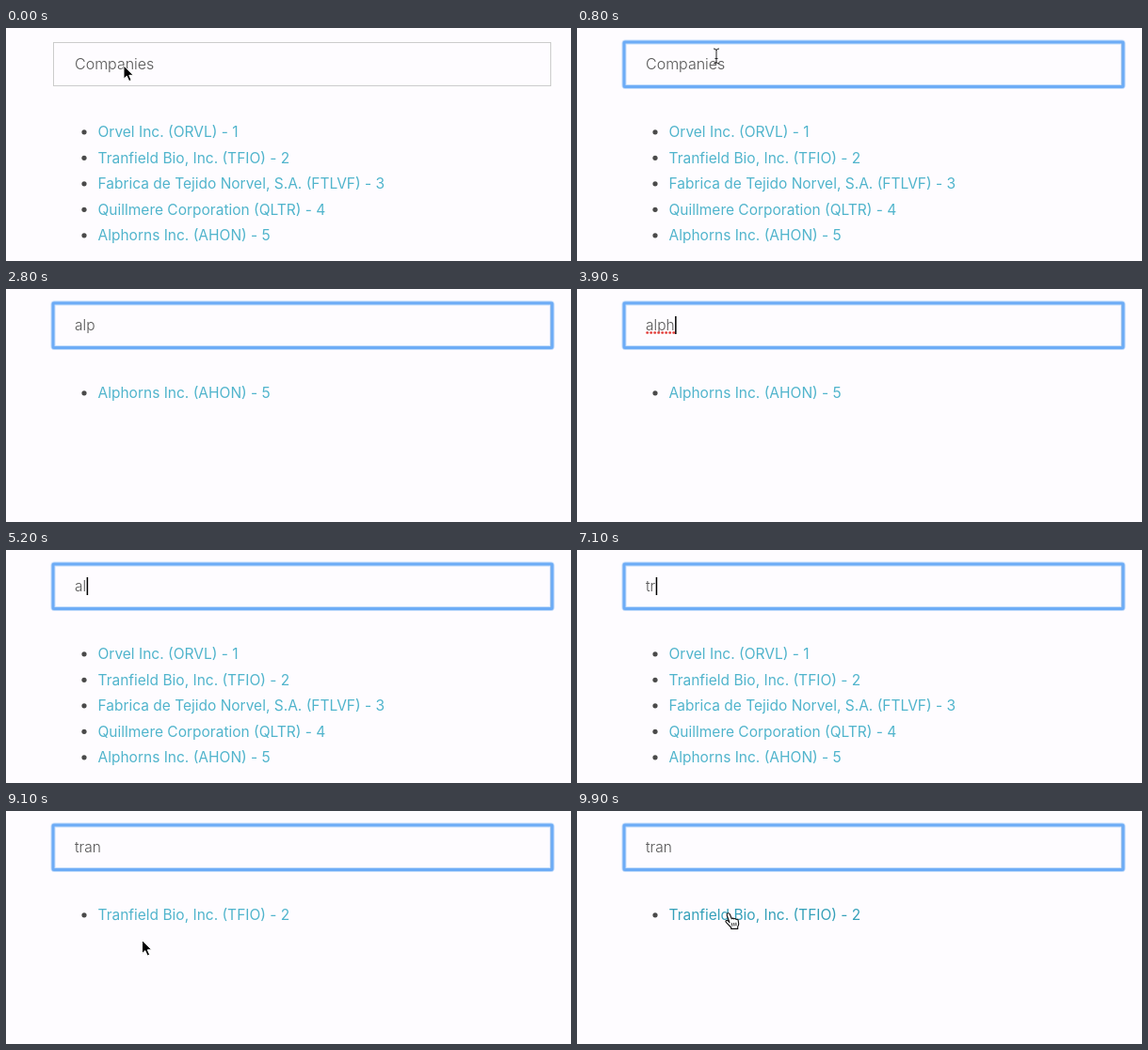
Write an HTML page that moves like this. It is 600 by 248 pixels and loops after 10 s.

```html
<!DOCTYPE html>
<html lang="en">
<head>
<meta charset="utf-8">
<title>Company search</title>
<style>
  html, body { margin: 0; width: 100%; height: 100%; overflow: hidden; background: #fefcff; }
  svg { display: block; width: 600px; height: 248px; }
  text { font: 400 15.5px Inter, "Open Sans", sans-serif; fill: #555; }
  #hint { font-weight: 350; font-size: 16px; }
  #typed { font-weight: 300; }
  #list text { fill: #50b4cc; }
  #list .hover text { fill: #35a0b9; }
  #list circle { fill: #4a4a4a; }
  .off { visibility: hidden; }
</style>
</head>
<body>
<svg viewBox="0 0 600 248">
  <rect x="50.5" y="15.5" width="528" height="46" fill="none" stroke="#ccc"/>
  <g id="ring" fill="none" stroke="#6dacf6">
    <rect x="50" y="15" width="530" height="47.5" rx="1.5" stroke-width="5" stroke-opacity=".4"/>
    <rect x="50" y="15" width="530" height="47.5" rx="1" stroke-width="3"/>
  </g>
  <text id="hint" x="73" y="44">Companies</text>
  <text id="typed" x="73" y="44"></text>
  <path id="misspelt" d="M74.5 46.5H103" stroke="#e2403c" stroke-width="2.6" stroke-linecap="round" stroke-dasharray="0.4 3.6"/>
  <rect id="caret" y="29" width="1.5" height="19"/>
  <g id="list"></g>
  <g id="mouse" stroke-linejoin="round">
    <path id="arrow" d="M0 0V14.2L3.3 11.2 5.7 16.6 8.1 15.5 5.8 10.3H10.2Z" stroke="#fff"/>
    <path id="beam" d="M-3-8Q0-8 0-6Q0-8 3-8M0-6V6M-3 8Q0 8 0 6Q0 8 3 8M-1.5 2.5H1.5" fill="none" stroke="#222"/>
    <g id="hand" fill="#fff" stroke="#111" stroke-width="1.1">
      <path d="M5 10.8L2.2 3Q1.8 1.2 3.2.8T5.4 2L7.3 6.8Q8.6 5.4 9.7 6.9Q11.2 5.8 12 7.4Q13.7 6.7 14.2 8.6L14.7 12Q14.7 13.6 13.7 15V17.4H6.7V16L1.5 10.7Q.2 9 1.7 8.5T5 10.8Z"/>
      <path d="M7.4 11.2L7.9 14.6M9.6 11L10 14.4M11.8 10.8L12 14.2" stroke-width=".9"/>
    </g>
  </g>
</svg>
<script>
const LOOP = 10000, TICK = 100;
const $ = id => document.getElementById(id);
const show = (id, on) => $(id).classList.toggle("off", !on);

const companies = [
  "Orvel Inc. (ORVL) - 1",
  "Tranfield Bio, Inc. (TFIO) - 2",
  "Fabrica de Tejido Norvel, S.A. (FTLVF) - 3",
  "Quillmere Corporation (QLTR) - 4",
  "Alphorns Inc. (AHON) - 5"
];

// [time, content of the field]
const edits = [
  [0, ""], [300, ""], [1900, "a"], [2000, "al"], [2300, "alp"], [2900, "alph"],
  [5100, "alp"], [5200, "al"], [5300, "a"], [5400, ""],
  [7000, "t"], [7100, "tr"], [7200, "tra"], [7400, "tran"]
];

// [time, pointer, x, y, glides to the next point]
const moves = [
  [0, "arrow", 125, 40], [100, "beam", 138, 35], [200, "beam", 148, 30], [1900, ""],
  [4500, "beam", 148, 31], [4600, "arrow", 143, 88], [4800, ""],
  [8000, "arrow", 121, 97], [8400, "arrow", 129, 104], [8500, "hand", 138, 112],
  [8600, "hand", 147, 117, true], [8800, "arrow", 144, 138, true],
  [9000, "arrow", 140, 153, true], [9200, "hand", 149, 122, true],
  [9400, "hand", 156, 109], [9500, "hand", 157, 108]
];

const rows = companies.map(name => {
  const row = document.createElementNS("http://www.w3.org/2000/svg", "g");
  row.innerHTML = `<circle cx="83" cy="110.8" r="2.6"/><text x="97.5" y="116">${name}</text>`;
  $("list").append(row);
  return row;
});

const lastIndex = (steps, t) => steps.findLastIndex(s => s[0] <= t);

function drawField(t) {
  const [since, text] = edits[lastIndex(edits, t)];
  const focused = t >= 200;
  $("typed").textContent = text;
  const width = text ? $("typed").getComputedTextLength() : 0;
  $("caret").setAttribute("x", 73.5 + width);
  show("ring", focused);
  show("hint", !text);
  show("caret", focused && Math.floor(Math.max(0, t - since) / 500) % 2 === 0);
  show("misspelt", t >= 3900 && t < 5100);
  return text;
}

function drawList(query, hover) {
  let line = 0;
  rows.forEach((row, i) => {
    const match = query.length < 3 || companies[i].toLowerCase().includes(query);
    row.classList.toggle("off", !match);
    row.classList.toggle("hover", match && hover);
    if (match) row.setAttribute("transform", `translate(0 ${27.5 * line++})`);
  });
}

function drawMouse(t) {
  const i = lastIndex(moves, t);
  let [start, kind, x = 0, y = 0, glide] = moves[i];
  if (glide) {
    const [end, , nextX, nextY] = moves[i + 1];
    const p = (t - start) / (end - start);
    x += (nextX - x) * p;
    y += (nextY - y) * p;
  }
  $("mouse").setAttribute("transform", `translate(${x} ${y})`);
  for (const id of ["arrow", "beam", "hand"]) show(id, id === kind);
  return kind;
}

function draw(now) {
  const t = Math.floor(now % LOOP / TICK) * TICK;
  const kind = drawMouse(t);
  drawList(drawField(t), kind === "hand");
}

const begin = performance.now();
function frame() {
  draw(performance.now() - begin);
  requestAnimationFrame(frame);
}
frame();
</script>
</body>
</html>
```
